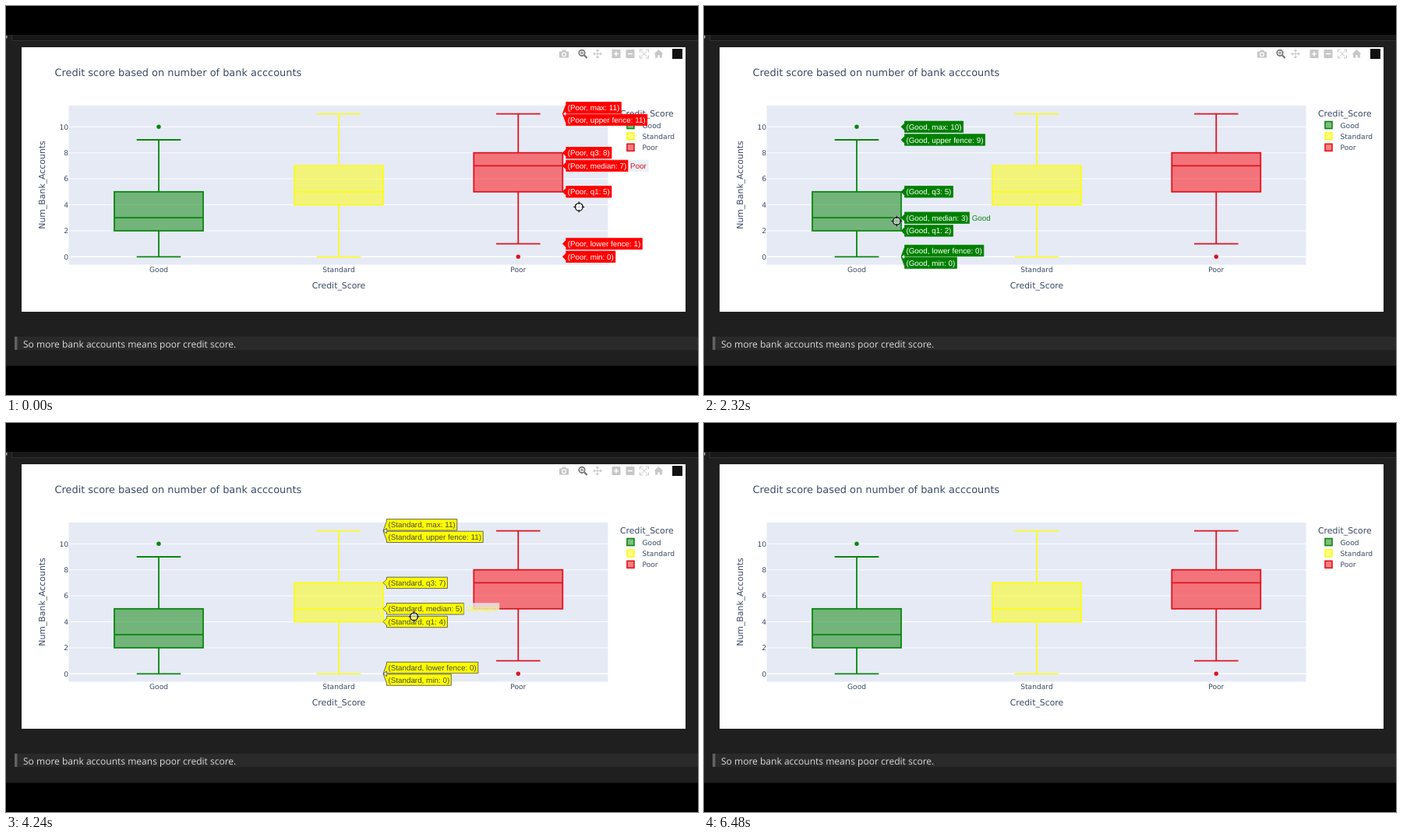
An HTML page that plays this animation: 888 px wide and 500 px high, repeating every 6.56 s.

```html
<!DOCTYPE html>
<html lang="en">
<head>
<meta charset="utf-8">
<title>Credit score box plot</title>
<style>
html, body { margin: 0; width: 100%; height: 100%; overflow: hidden; background: #000; }
svg { display: block; width: 888px; height: 500px; }
text { font-family: "DejaVu Sans", Verdana, sans-serif; fill: #3b4b67; text-rendering: geometricPrecision; }
.tick { font-size: 9.15px; }
.axis { font-size: 10.88px; }
.title { font-size: 12.9px; }
.note { font: 12.04px "Open Sans", sans-serif; fill: #dadada; }
.tip text { font: 9.85px "Liberation Sans", Arial, sans-serif; }
.tip { visibility: hidden; }
</style>
</head>
<body>
<svg id="stage" viewBox="0 0 888 500">
  <rect width="888" height="500" fill="#000"/>
  <rect y="37" width="888" height="425.5" fill="#1f1f1f"/>
  <path d="M7.5 37V44.5H888V37Z" fill="#181818"/>
  <path d="M7.5 37V44.5H888" fill="none" stroke="#313131"/>
  <rect y="38" width="1.5" height="3.5" fill="#aaa"/>
  <rect x="20" y="53" width="852" height="340" fill="#fff"/>
  <rect x="11" y="425" width="877" height="17" fill="#2a2a2a"/>
  <rect x="11" y="425" width="3.5" height="17" fill="#616161"/>
  <text class="note" x="22" y="438.5">So more bank accounts means poor credit score.</text>

  <text class="title" x="62.5" y="90">Credit score based on number of bank acccounts</text>
  <rect x="80.5" y="128" width="692" height="204.5" fill="#e5eaf5"/>
  <g id="plot"></g>
  <text class="axis" x="427" y="362.8" text-anchor="middle">Credit_Score</text>
  <text class="axis" transform="translate(50 230) rotate(-90)" text-anchor="middle">Num_Bank_Accounts</text>
  <text class="axis" x="788" y="142">Credit_Score</text>
  <g id="legend"></g>

  <g id="modebar" fill="#c7c7c7" stroke="#c7c7c7" stroke-width="0">
    <path d="M710 58.5h3l1.2-2h3.8l1.2 2h3v8h-12.2z"/>
    <circle cx="716" cy="62.2" r="2.4" fill="none" stroke="#fff" stroke-width="1.2"/>
    <g fill="none" stroke="#777">
      <circle cx="739" cy="60.3" r="3.7" stroke-width="1.8"/>
      <path d="M742 63.3l3.6 3.6" stroke-width="2.2"/>
      <path d="M737 60.3h4M739 58.3v4" stroke-width="1"/>
    </g>
    <path d="M754 61.5h10M759 56.5v10" stroke-width="1"/>
    <path d="M759 55.5l2.2 2.6h-4.4zM759 67.5l2.2-2.6h-4.4zM753 61.5l2.6-2.2v4.4zM765 61.5l-2.6-2.2v4.4z"/>
    <rect x="777.5" y="56" width="11" height="11" rx="1"/>
    <path d="M780 61.5h6M783 58.5v6" stroke="#fff" stroke-width="1.6"/>
    <rect x="795.5" y="56" width="11" height="11" rx="1"/>
    <path d="M798 61.5h6" stroke="#fff" stroke-width="1.6"/>
    <path d="M813.5 59.5v-3.5h3.5M821 56h3.5v3.5M824.5 63.5v3.5h-3.5M817 67h-3.5v-3.5M815 57.5l8 8M823 57.5l-8 8" fill="none" stroke-width="1"/>
    <path d="M837.5 56l6 5.5h-1.6v5h-3.2v-3.3h-2.4v3.3h-3.2v-5h-1.6z"/>
    <rect x="855" y="55" width="13" height="13" fill="#111"/>
  </g>

  <g id="tips"></g>
  <g id="cursor" fill="none" stroke="#161616" stroke-width="1.3">
    <path d="M0-7v4M0 7v-4M-7 0h4M7 0h-4" stroke="#fff" stroke-width="2.6" opacity=".55"/>
    <circle r="5" stroke="#fff" stroke-width="2.6" opacity=".5"/>
    <circle r="5" fill="#fff" fill-opacity=".3"/>
    <path d="M0-7v3.4M0 7v-3.4M-7 0h3.4M7 0h-3.4"/>
    <circle r=".6" fill="#888" stroke="none"/>
  </g>
</svg>
<script>
const LOOP = 6560, STEP = 80, RIGHT = 773;
const $ = id => document.getElementById(id);
const yOf = v => 322.3 - 16.7 * v;

function add(parent, tag, attrs, text) {
  const el = document.createElementNS('http://www.w3.org/2000/svg', tag);
  for (const k in attrs) el.setAttribute(k, attrs[k]);
  if (text) el.textContent = text;
  parent.appendChild(el);
  return el;
}

const groups = [
  { name: 'Good', x: 196, line: '#0a850f', fill: '#008000', ink: '#fff', edge: '#008000',
    max: 10, upper: 9, q3: 5, median: 3, q1: 2, lower: 0, min: 0, dot: 10 },
  { name: 'Standard', x: 427, line: '#fbfb20', fill: '#ffff00', ink: '#444', edge: '#444',
    max: 11, upper: 11, q3: 7, median: 5, q1: 4, lower: 0, min: 0 },
  { name: 'Poor', x: 657.3, line: '#de1420', fill: '#ff0000', ink: '#fff', edge: '#ff0000',
    max: 11, upper: 11, q3: 8, median: 7, q1: 5, lower: 1, min: 0, dot: 0 }
];

function drawGrid(plot) {
  for (let v = 0; v <= 10; v += 2) {
    add(plot, 'path', { d: `M80.5 ${yOf(v)}H${RIGHT}`, stroke: '#fff', 'stroke-width': v ? 0.9 : 1.6 });
    add(plot, 'text', { class: 'tick', x: 80, y: yOf(v) + 3.2, 'text-anchor': 'end' }, String(v));
  }
}

function drawBox(plot, g) {
  const half = 57, cap = 28.3;
  const pen = { fill: 'none', stroke: g.line, 'stroke-width': 1.8 };
  add(plot, 'rect', { x: g.x - half, y: yOf(g.q3), width: 2 * half, height: yOf(g.q1) - yOf(g.q3),
    ...pen, fill: g.fill, 'fill-opacity': 0.5 });
  add(plot, 'path', { ...pen, d: `M${g.x - half} ${yOf(g.median)}h${2 * half}
    M${g.x} ${yOf(g.q3)}V${yOf(g.upper)}m${-cap} 0h${2 * cap}
    M${g.x} ${yOf(g.q1)}V${yOf(g.lower)}m${-cap} 0h${2 * cap}` });
  if (g.dot !== undefined) add(plot, 'circle', { cx: g.x, cy: yOf(g.dot), r: 2.7, fill: g.line });
  add(plot, 'text', { class: 'tick', x: g.x, y: 342, 'text-anchor': 'middle' }, g.name);
}

function drawKey(g, i) {
  const y = 153 + 14.4 * i;
  add($('legend'), 'rect', { x: 797, y: y - 4.5, width: 9, height: 9, fill: g.fill,
    'fill-opacity': 0.5, stroke: g.line, 'stroke-width': 1.6 });
  add($('legend'), 'text', { class: 'tick', x: 816.5, y: y + 3.5 }, g.name);
}

// One hover label: an arrow at the box edge and a plate, moved by dy when crowded
function drawLabel(tip, g, text, value, dy) {
  const x = g.x + 57, y = yOf(value), a = 4.5, h = 7.2;
  const plate = add(tip, 'path', { fill: g.fill, stroke: g.edge, 'stroke-width': 0.8 });
  const label = add(tip, 'text', { x: x + 6.4, y: y + dy + 3.5, style: `fill:${g.ink}` },
    `(${g.name}, ${text}: ${value})`);
  const w = label.getComputedTextLength() + 4;
  plate.setAttribute('d', `M${x} ${y}l${a} ${dy + a}v${h - a}h${w}v${-2 * h}h${-w}v${h - a}Z`);
  return x + a + w;
}

function drawTip(g) {
  const tip = add($('tips'), 'g', { class: 'tip' });
  const shift = (a, b) => a === b ? 7.8 : 0;
  const top = shift(g.max, g.upper), low = shift(g.lower, g.min);
  drawLabel(tip, g, 'max', g.max, -top);
  drawLabel(tip, g, 'upper fence', g.upper, top);
  drawLabel(tip, g, 'q3', g.q3, 0);
  const end = drawLabel(tip, g, 'median', g.median, 0);
  drawLabel(tip, g, 'q1', g.q1, 0);
  drawLabel(tip, g, 'lower fence', g.lower, -low);
  drawLabel(tip, g, 'min', g.min, low);
  const y = yOf(g.median);
  const back = add(tip, 'rect', { x: end, y: y - 7.5, height: 15, fill: '#e5ecf6', 'fill-opacity': 0.8 });
  const name = add(tip, 'text', { x: end + 2.8, y: y + 3.5, style: `fill:${g.line}` }, g.name);
  back.setAttribute('width', name.getComputedTextLength() + 5.5);
  return tip;
}

drawGrid($('plot'));
groups.forEach(g => drawBox($('plot'), g));
groups.forEach(drawKey);
const tips = groups.map(drawTip);

// Pointer stops: time, x, y
const path = [
  [0, 735.3, 258.3], [560, 735.3, 258.3], [1040, 573, 242], [1840, 329, 264], [2320, 247.3, 276.5],
  [2480, 238, 277], [2640, 238, 277], [3440, 410.3, 259], [3600, 421, 258], [3680, 421, 258],
  [4880, 704, 237.7], [5440, 735, 258], [5680, 735, 258], [6160, 800, 270], [LOOP, 800, 270]
];

function slope(i, k) {
  const p = path[i - 1], q = path[i], r = path[i + 1];
  if (!p || !r || p[1] === q[1] || q[1] === r[1]) return 0;
  return (r[k] - p[k]) / (r[0] - p[0]);
}

function at(t, k) {
  let i = 0;
  while (path[i + 1][0] <= t) i++;
  const a = path[i], b = path[i + 1], d = b[0] - a[0], u = (t - a[0]) / d;
  const w = u * u * (3 - 2 * u);
  return a[k] + (b[k] - a[k]) * w
    + d * u * (1 - u) * (slope(i, k) * (1 - u) - slope(i + 1, k) * u);
}

function frame() {
  const t = Math.floor(performance.now() % LOOP / STEP) * STEP;
  const x = at(t, 1), y = at(t, 2);
  const inside = x < RIGHT;
  const over = !inside ? -1 : x < 311.5 ? 0 : x < 542 ? 1 : 2;
  tips.forEach((tip, i) => tip.style.visibility = i === over ? 'visible' : 'hidden');
  $('cursor').setAttribute('transform', `translate(${x} ${y})`);
  $('cursor').style.visibility = inside ? 'visible' : 'hidden';
  $('modebar').style.opacity = Math.max(0, Math.min(1, (6400 - t) / 320));
  requestAnimationFrame(frame);
}
frame();
</script>
</body>
</html>
```
